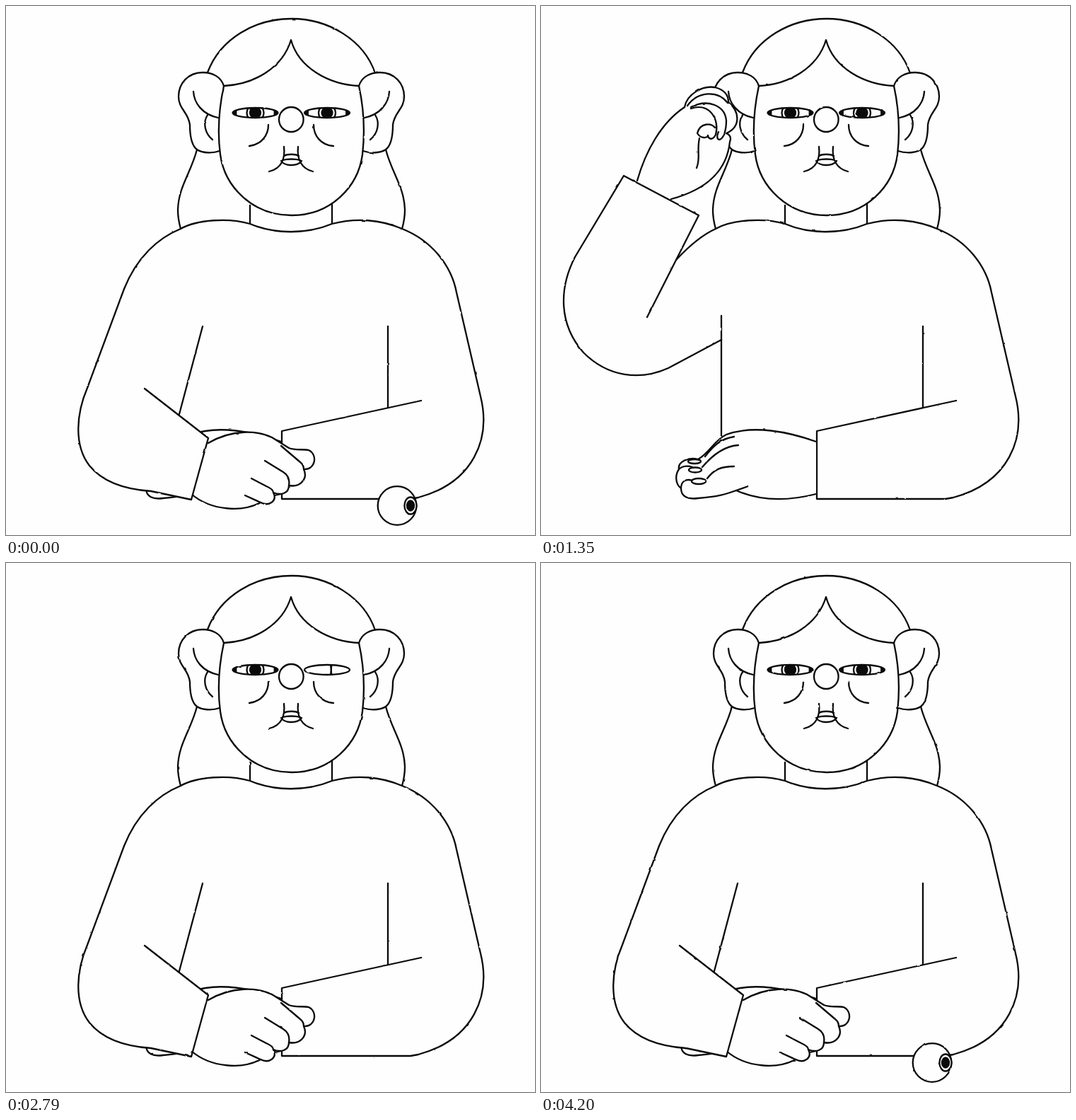
These frames come from a looping animation (748 px wide and 748 px high, 4320 ms). An HTML page:

```html
<!DOCTYPE html>
<html lang="en">
<head>
<meta charset="utf-8">
<title>Eye loop</title>
<style>
html, body { margin: 0; width: 100%; height: 100%; overflow: hidden; background: #fefefe; }
svg { display: block; width: 100vw; height: 100vh; }
</style>
</head>
<body>
<svg viewBox="0 0 748 748">
  <defs>
    <filter id="boil" filterUnits="userSpaceOnUse" x="0" y="0" width="748" height="748" color-interpolation-filters="sRGB">
      <feTurbulence id="noise" type="fractalNoise" baseFrequency="0.08" numOctaves="2" result="n"/>
      <feDisplacementMap in="SourceGraphic" in2="n" scale="1.8" xChannelSelector="R" yChannelSelector="G"/>
    </filter>
    <clipPath id="lensL"><ellipse cx="352.5" cy="151" rx="32" ry="7"/></clipPath>
    <clipPath id="lensR"><ellipse cx="454" cy="151" rx="32" ry="7"/></clipPath>
  </defs>
  <g id="stage" filter="url(#boil)" fill="#fefefe" stroke="#0a0a0a" stroke-width="2.3" stroke-linecap="round" stroke-linejoin="round"></g>
</svg>
<script>
const LOOP = 4320, TICK = 30, STEP = 102.25, BALL = 27.3;
const stage = document.getElementById('stage');
const noise = document.getElementById('noise');

const shape = d => `<path d="${d}"/>`;
const line = d => `<path d="${d}" fill="none"/>`;
const oval = (x, y, rx, ry, extra = '') => `<ellipse cx="${x}" cy="${y}" rx="${rx}" ry="${ry}" ${extra}/>`;
const group = (body, transform) => `<g transform="${transform}">${body}</g>`;
const flip = body => group(body, 'translate(807 0) scale(-1 1)');
const NUM = /-?\d+(\.\d+)?/g;

// Blend two paths of the same structure.
function mix(a, b, t) {
  const end = b.match(NUM);
  let i = 0;
  return a.replace(NUM, v => (+v + (end[i++] - v) * t).toFixed(2));
}

// Linear interpolation over rows of [frame, value, ...].
function key(f, rows) {
  let i = 0;
  while (i < rows.length - 2 && f >= rows[i + 1][0]) i++;
  const a = rows[i], b = rows[i + 1];
  const t = Math.max(0, Math.min(1, (f - a[0]) / (b[0] - a[0])));
  return a.slice(1).map((v, k) => v + (b[k + 1] - v) * t);
}

// ---- fixed parts ----
const hairSide = line('M270,203 C262,235 244,255 243,288 C243,300 245,308 247,315');
const ear = shape('M308,113 C304,100 292,94 278,94 C258,94 244,109 244,128 C244,146 258,150 260,168 C260,180 261,192 267,200 C273,208 290,209 302,205')
  + line('M265,121 C266,137 277,153 300,158') + line('M285,154 C278,165 281,180 292,189');

const backParts = hairSide + flip(hairSide)
  + line('M345,282 V309 M461,280 V308')
  + shape('M247,315 C270,302 315,299 345,308 C380,323 425,323 461,308 C495,299 530,302 560,315 C603,332 630,368 637,405 L671,552 C686,612 661,674 583,695 L572,697 L390,697 V601 L587,558')
  + line('M540,453 V568');

const head = shape('M285,94 C303,46 352,18 404,18 C456,18 506,48 522,95')
  + ear + flip(ear)
  + shape('M308,113 C300,150 299,180 303,210 C309,255 348,296 404,296 C460,296 498,255 504,210 C508,175 506,145 499,113')
  + shape('M308,113 C350,111 391,88 403,48 C414,88 457,111 499,113');

const features = oval(403.3, 160.5, 17.3, 17.5)
  + line('M371,168 C371,183 361,196 344,198 M435,168 C435,184 446,197 463,198')
  + line('M393,199 C395,215 390,230 372,234 M413,199 C411,217 418,230 434,234')
  + line('M393,212 C398,209 409,209 414,212 M391,218 C398,216 409,216 416,218 M389,219 C394,227 412,227 418,219');

const restHand = shape('M389,616 C350,602 300,592 262,606 C245,614 238,632 222,641 C208,637 193,645 195,655 C190,662 189,675 198,682 C198,694 208,698 222,696 C250,694 262,690 276,685 C310,700 350,700 389,690')
  + line('M273,609 C255,612 245,620 232,637 M279,621 C262,622 245,632 228,652 M273,651 C255,651 245,655 235,668 M276,685 L293,679')
  + line('M195,655 C200,650 208,650 214,652 M198,682 C198,672 205,668 214,671')
  + oval(217, 644, 9, 3) + oval(218, 656, 9, 3.5) + oval(223, 672, 10, 4);

// ---- moving hand shapes ----
const hands = {
  clasp: shape('M286,618 C320,598 355,600 376,610 L400,625 C410,629 420,626 428,628 C441,634 438,656 421,655 C427,668 417,681 400,678 C400,690 388,692 378,688 C384,700 372,708 360,702 C335,716 290,714 262,690')
    + line('M389,622 L416,645 C420,648 421,652 421,655 M366,643 L392,659 C400,664 401,672 400,678 M347,668 L368,679 C375,682 378,685 378,688 M338,692 L360,702'),
  reach: shape('M440,575 C452,569 468,570 469,584')
    + shape('M317,580 C355,568 400,566 430,573 C455,580 480,595 491,614 C493,628 488,636 476,633 C479,645 472,654 462,652 C455,650 450,645 447,640 C448,650 440,658 430,655 C430,664 422,667 412,663 L385,652 C360,660 335,650 317,637')
    + line('M416,588 C440,594 462,605 476,633 M403,610 C430,618 445,626 447,640 M397,627 C418,633 428,642 430,655')
    + oval(484, 625, 7, 9, 'transform="rotate(18 484 625)"') + oval(469, 649, 6, 3.5, 'transform="rotate(-25 469 649)"'),
  fist: shape('M136,247 C148,205 170,165 203,143 C206,125 228,112 246,115 C258,118 265,125 265,136 C280,148 284,170 262,180 C268,182 269,187 267,192 C262,240 225,262 184,273')
    + line('M207,141 C222,120 250,119 264,137 M212,143 C235,131 260,140 262,162 C262,176 258,188 252,189 C248,188 249,182 251,178')
    + line('M212,145 C238,136 253,160 247,182 C243,190 237,189 236,183 M246,172 C240,165 225,165 221,180 C226,188 236,187 236,183 M224,187 C220,205 226,215 220,229'),
  flat: shape('M160,264 C170,235 185,210 197,195 C205,165 211,135 217,113 C222,98 238,95 246,103 C249,108 248,112 248,116 C255,118 258,126 257,135 C258,160 250,175 245,197 L254,215 C257,200 265,191 278,191 C290,192 291,200 287,212 C275,245 250,282 218,302')
    + line('M204,185 C210,160 222,130 230,119 C236,114 243,114 248,116 M229,203 C238,180 244,150 251,125 M237,196 C246,215 230,240 226,268 M254,215 L253,228')
    + oval(222, 115, 3, 9, 'transform="rotate(18 222 115)"') + oval(232, 126, 2.5, 8, 'transform="rotate(20 232 126)"')
};

// ---- left arm ----
const low = {
  rest: 'M247,315 C215,328 185,355 167,400 L115,540 C100,575 95,620 118,650 C140,677 175,684 205,686 L262,698 L286,611 L196,541 M278,453 L245,577',
  cross: 'M247,315 C212,330 184,362 168,398 L126,512 C115,550 120,605 157,640 C180,663 210,669 245,669 L314,667 L318,576 L209,543 M278,453 L254,555',
  grab: 'M247,315 C212,330 188,362 174,398 L140,512 C125,570 145,650 200,690 C250,725 300,742 340,744 L404,745 L410,661 L235,570 M278,453 L260,583'
};
const high = [
  'M255,472 L180,512 C140,530 95,525 60,490 C25,450 25,400 48,355 L117,240 L223,296 L150,440',
  'M255,474 L190,508 C145,531 95,523 55,480 C20,440 20,385 50,345 L124,243 L220,303 L143,443'
];
const BEND = [0, 0, .1, .3, .5, .7, .85, 1, 1, 1, 1];
const ELBOW = [120, 425];

function bend(d, deg) {
  let i = 0;
  return d.replace(/([\d.-]+),([\d.-]+)/g, (_, px, py) => {
    const a = deg * BEND[i++] * Math.PI / 180, x = px - ELBOW[0], y = py - ELBOW[1];
    return (ELBOW[0] + x * Math.cos(a) - y * Math.sin(a)).toFixed(2) + ','
      + (ELBOW[1] + x * Math.sin(a) + y * Math.cos(a)).toFixed(2);
  });
}

function lowArm(d, hand) {
  const cuff = d.match(/L([\d.]+),([\d.]+) L([\d.]+),([\d.]+) L/).slice(1).map(Number);
  const [ax, ay] = hand === 'clasp' ? [274, 654.5] : [316, 621.5];
  const [sleeve, chest] = d.split(' M');
  const dx = (cuff[0] + cuff[2]) / 2 - ax, dy = (cuff[1] + cuff[3]) / 2 - ay;
  return group(hands[hand], `translate(${dx} ${dy})`) + shape(sleeve) + line('M' + chest);
}

function highArm(f) {
  const [deg, dx] = key(f, [[9, 52, 12], [10, 27, 4], [11, 9, 0], [12, -2, 0], [13, 0, 0], [14, 2, 0], [15, 0, 0],
    [16, -5, 0], [17, 0, 0], [18, 0, 0], [19, -5, -4], [20, -8, -9], [21, 2, 0], [22, 0, 0], [23, 38, 6]]);
  const flat = f >= 16;
  const arm = group(hands[flat ? 'flat' : 'fist'], `rotate(${deg} ${ELBOW})`) + shape(bend(high[+flat], deg));
  return group(arm, `translate(${dx} 0)`);
}

const isHigh = f => f >= 9 && f <= 23;
const torsoSide = line('M247,315 C225,325 207,342 192,358 L178,372 M255,438 V610');

function leftArm(f) {
  if (isHigh(f)) return highArm(f);
  if (f < 7) {
    const [t] = key(f, [[0, 0], [1, 0], [2, .08], [3, .4], [4, .8], [5, 1], [6, 1]]);
    return lowArm(mix(low.rest, low.grab, t), f < 4 ? 'clasp' : 'reach');
  }
  if (f < 9) return lowArm(mix(low.cross, low.grab, f === 8 ? -.3 : 0), 'reach');
  const [t] = key(f, [[24, 1.7], [25, 1.3], [26, 1], [27, 1]]);
  return lowArm(mix(low.cross, low.rest, t), 'clasp');
}

// ---- eyes ----
// A ball that rolls as it slides, so its iris runs ahead and turns away.
function socketBall(x, slide) {
  const turn = slide / BALL, c = x + slide, iris = c + BALL * Math.sin(turn), thin = Math.cos(turn);
  return oval(c, 151, BALL, BALL)
    + (thin > 0 ? oval(iris, 151, 12 * thin, 12) + oval(iris, 151, 7.5 * thin, 7.5, 'fill="#0a0a0a"') : '');
}

function socket(x, id, slide) {
  const balls = socketBall(x, slide) + (slide ? socketBall(x, slide - 2 * BALL) : '');
  return `<g clip-path="url(#${id})">${oval(x, 151, 33, 8, 'fill="#0a0a0a"')}${balls}</g>`
    + oval(x, 151, 32, 7, 'fill="none"');
}

function looseEye(f) {
  if (f > 5 && f < 32) return '';
  const [x, y, sq, ox, oy, s] = key(f < 6 ? f + 42 : f, [
    [32, 546, 145, 1, 8, 0, .85], [33, 556, 190, 1, 16, 6, 1], [34, 557, 330, 1.05, 6, 18, 1], [35, 555, 540, 1.08, -8, 12, 1],
    [36, 552.5, 710, .89, -11, -2, 1], [37, 552.5, 696, 1.03, -5, -2, 1], [38, 553, 692, 1, 4, -1, 1],
    [39, 553, 704, 1, 12, 0, 1], [40, 553, 707, .98, 17, 0, 1], [41, 553, 706.5, 1, 19, 0, 1], [47, 553, 706.5, 1, 19, 0, 1]]);
  const thin = Math.sqrt(Math.max(.1, 1 - (ox * ox + oy * oy) / (BALL * BALL)));
  const turn = `transform="rotate(${Math.atan2(oy, ox) * 180 / Math.PI} ${ox} ${oy})"`;
  return group(oval(0, 0, BALL, BALL) + oval(ox, oy, 12 * thin, 12, turn)
    + oval(ox, oy, 7 * thin, 7, turn + ' fill="#0a0a0a"'), `translate(${x} ${y}) scale(${s} ${s * sq})`);
}

function draw(f) {
  const full = 2 * BALL;
  const [l] = key(f, [[20, 0], [21, 4], [22, 10.3], [23, 24], [24, 42], [25, full]]);
  const [r] = key(f, [[25, 0], [26, 14], [27, 33], [28, 47], [29, full]]);
  noise.setAttribute('seed', f + 1);
  stage.innerHTML = backParts + (isHigh(f) ? torsoSide : '') + head
    + socket(352.5, 'lensL', l % full) + socket(454, 'lensR', r % full)
    + features + restHand + looseEye(f) + leftArm(f);
}

let shown = -1;
function update(now) {
  const f = Math.floor(Math.floor(now % LOOP / TICK) * TICK / STEP);
  if (f !== shown) draw(shown = f);
}
const start = performance.now();
function loop() {
  update(performance.now() - start);
  requestAnimationFrame(loop);
}
loop();
</script>
</body>
</html>
```
